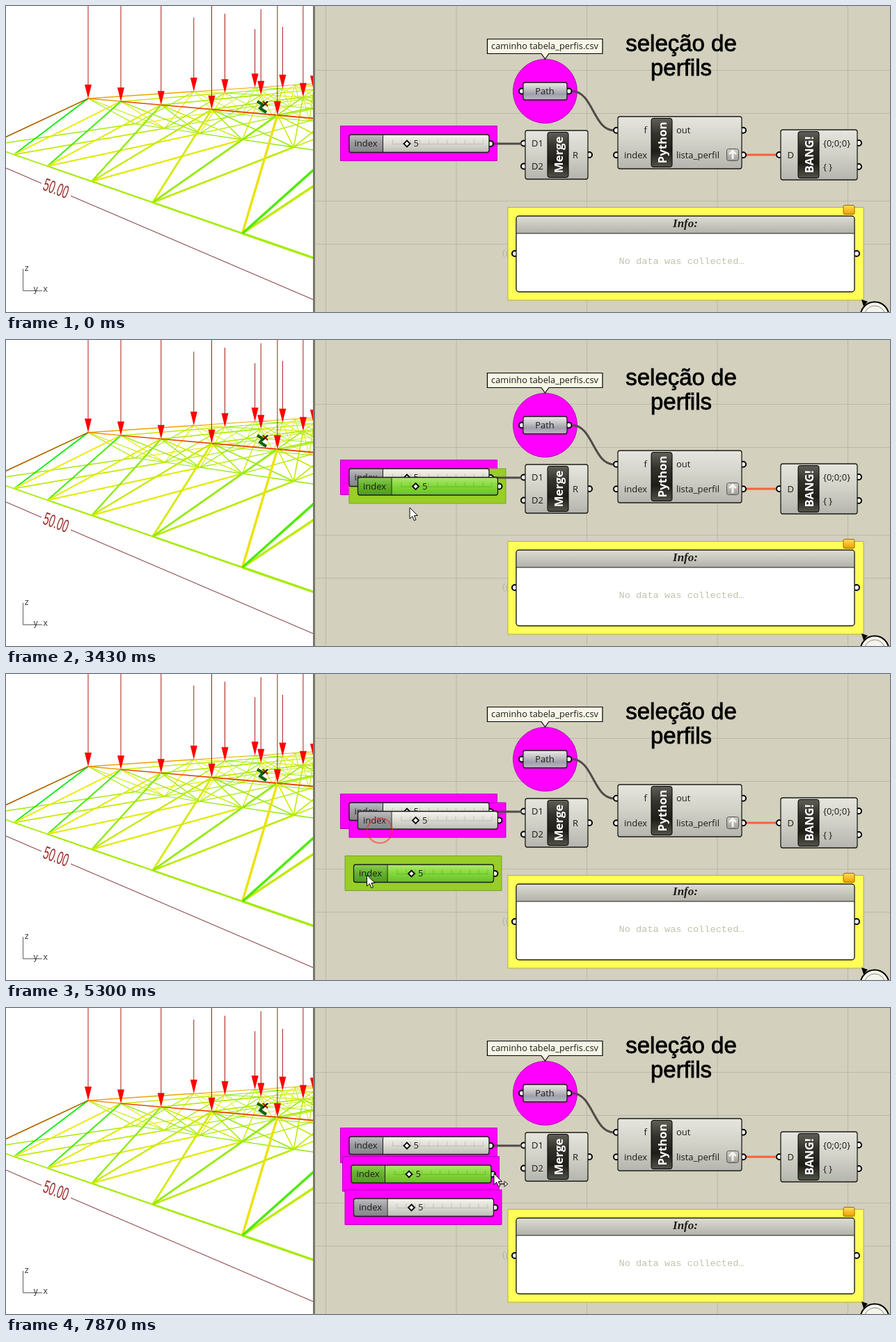
These frames come from a looping animation (1270x440 px, 8 s). An HTML page with a canvas:

```html
<!DOCTYPE html>
<html lang="pt">
<head>
<meta charset="utf-8">
<title>Seleção de perfils</title>
<style>
  html, body { margin: 0; width: 100%; height: 100%; overflow: hidden; background: #fff }
  canvas { display: block }
</style>
</head>
<body>
<canvas id="stage" width="1270" height="440"></canvas>
<script>
const stage = document.getElementById('stage');
let c = stage.getContext('2d');
const UI = '"Open Sans", "Noto Sans", sans-serif', SANS = '"Liberation Sans", Arial, sans-serif';
const MAGENTA = '#ff00ff', EDGE = '#b800b8', INK = '#1c1c18', WIRE = '#504a48';

// ---------- drawing helpers ----------
function paint(fill, stroke, width) {
  if (fill) { c.fillStyle = fill; c.fill(); }
  if (stroke) { c.strokeStyle = stroke; c.lineWidth = width; c.stroke(); }
}

function path(points, stroke, width = 1, close, fill) {
  c.beginPath();
  points.forEach(([x, y]) => c.lineTo(x, y));
  if (close) c.closePath();
  paint(fill, stroke, width);
}
const line = (a, b, color, width) => path([a, b], color, width);

function box(x, y, w, h, r, fill, stroke, width = 1) {
  c.beginPath();
  c.roundRect(x, y, w, h, r);
  paint(fill, stroke, width);
}

function circle(x, y, r, fill, stroke, width = 1) {
  c.beginPath();
  c.arc(x, y, r, 0, 7);
  paint(fill, stroke, width);
}

function shade(y, h, ...colors) {
  const g = c.createLinearGradient(0, y, 0, y + h);
  colors.forEach((color, i) => g.addColorStop(i / (colors.length - 1), color));
  return g;
}

function text(s, x, y, align = 'left', font = '13px ' + UI, color = INK) {
  c.font = font;
  c.fillStyle = color;
  c.textAlign = align;
  c.fillText(s, x, y);
}

const grip = (x, y) => circle(x, y, 4, '#fff', '#000', 2);

function wire(x1, y1, x2, y2, color) {
  const mid = (x1 + x2) / 2;
  c.beginPath();
  c.moveTo(x1, y1);
  c.bezierCurveTo(mid, y1, mid, y2, x2, y2);
  paint(null, color, 3);
}

// ---------- left: space frame in perspective ----------
// i runs along the front, j into the depth, drop is the height below the top layer
const depth = (i, j) => 1 - .0933 * i + .364 * j;
const spot = (i, j, drop = 0) => [
  (118 + 31.6 * i + 250 * j) / depth(i, j),
  (133 - 8.65 * i + 34.8 * j + drop) / depth(i, j)];
const low = (i, j) => spot(i + .5, j - .5, 53.5);

let seed = 7;
const random = () => (seed = seed * 16807 % 2147483647) / 2147483647;

function frameBars() {
  const bar = (a, b, w, hue = 58 + 26 * random()) =>
    line(a, b, `hsl(${hue} 100% 46%)`, Math.min(3.4, Math.max(.9, 1.35 / w)));

  for (let j = 4; j >= 0; j--) {
    for (let i = -1; i < 6; i++) {
      const w = depth(i + .5, j - .5), node = low(i, j);
      bar(node, low(i, j + 1), w);
      bar(node, low(i + 1, j), w, j ? 84 : 78);
      // webs from each lower node up to the corners of its bay
      for (const di of [0, 1]) for (const dj of [-1, 0]) {
        if (i + di < 0 || j + dj < 0) continue;
        const hue = j || i < 0 ? undefined : di ? 60 + 2.5 * i * i : Math.max(58, 120 - 18 * i);
        bar(node, spot(i + di, j + dj), w, hue);
      }
      if (i < 0) continue;
      bar(spot(i, j), spot(i, j + 1), depth(i, j), i ? undefined : 42);
      bar(spot(i, j), spot(i + 1, j), depth(i, j), j ? undefined : i ? 18 : 36);
    }
  }
  line(low(-1, 0), spot(0, 0), '#c04010', 1.2);
}

function loads() {
  for (let j = 2; j >= 0; j--)
    for (let i = 0; i < 5; i++) {
      const [x, y] = spot(i, j), start = y - 145 / depth(i, j);
      line([x, start], [x, y - 19], '#a81c14');
      path([[x - 5, y - 20], [x + 5, y - 20], [x, y]], null, 0, true, '#ff0000');
    }
}

function viewport() {
  c.save();
  c.beginPath();
  c.rect(0, 0, 441, 440);
  c.clip();
  frameBars();
  path([[361, 137], [369, 142], [365, 147], [374, 153]], '#146014', 4);
  line([369, 137], [376, 144], '#c01000', 2);
  line([376, 137], [369, 144], '#301000', 2);
  loads();
  line([0, 233], [51, 255], '#7c3030');
  line([93, 273], [441, 422], '#7c3030');
  c.save();
  c.transform(.75, .28, -.45, 1.32, 72, 262);
  text('50.00', 0, 6.5, 'center', '18.5px ' + SANS, '#982c28');
  c.restore();
  path([[24.5, 378], [24.5, 409.5], [52, 409.5]], '#606060');
  for (const [s, x, y] of [['z', 26, 381], ['y', 39, 411], ['x', 53, 411]])
    text(s, x, y, 'left', '12px "DejaVu Sans Mono", monospace', '#404040');
  c.restore();
}

// ---------- right: node canvas ----------
function node(x, y, w, h, label, barX, inputs, outputs) {
  const ports = (names, edge, textX, align) => names.forEach((name, k) => {
    const py = y + 2 + (h - 4) * (k + .5) / names.length;
    grip(edge, py);
    labels.push(() => text(name, textX, py + 4.5, align));
  });
  const labels = [];
  ports(inputs, x - 2, barX - 6, 'right');
  ports(outputs, x + w + 2, barX + 36, 'left');
  box(x, y, w, h, 3, shade(y, h, '#e6e5de', '#d2d1c8', '#b5b4ae'), INK, 1.3);
  box(barX, y + 2.5, 30, h - 5, 3, shade(y, h, '#66655c', '#33322c', '#1e1d18', '#5a594f'), '#000');
  labels.forEach(draw => draw());
  c.save();
  c.translate(barX + 21.5, y + h / 2);
  c.rotate(-Math.PI / 2);
  text(label, 0, 0, 'center', 'bold 16.8px ' + UI, '#fff');
  c.restore();
}

function scene() {
  c.fillStyle = '#fff';
  c.fillRect(0, 0, 1270, 440);
  viewport();
  c.fillStyle = '#d3d0bd';
  c.fillRect(441, 0, 829, 440);
  c.fillStyle = '#77776a';
  c.fillRect(441, 0, 3, 440);
  const grid = 'rgba(140,140,145,.35)';
  for (let x = 459.5; x < 1270; x += 187.5) line([x, 0], [x, 440], grid);
  for (let y = 92.5; y < 440; y += 188)
    for (const dy of [0, 62]) line([444, y + dy], [1270, y + dy], grid);

  // heading
  for (const [s, y] of [['seleção de', 65], ['perfils', 100]]) {
    text(s, 970, y, 'center', '33px ' + SANS, '#000');
    c.lineWidth = .8;
    c.strokeStyle = '#000';
    c.strokeText(s, 970, y);
  }

  // path parameter and its label
  circle(774.5, 122.5, 46, MAGENTA, EDGE);
  path([[691.5, 47.5], [857, 47.5], [857, 68.5], [780, 68.5], [774.5, 76], [769, 68.5], [691.5, 68.5]],
    '#000', 1.2, true, '#f7f6e6');
  text('caminho tabela_perfis.csv', 774, 62, 'center', '12.8px ' + UI);
  grip(741, 122.5);
  grip(808.5, 122.5);
  box(743, 110, 63, 25, 3, shade(110, 25, '#ececea', '#c8c8ca', '#a09eaa', '#bcbac6'), INK, 1.3);
  text('Path', 774, 127, 'center');
  wire(813, 122.5, 874, 179, WIRE);
  wire(1062, 214, 1108, 214, '#f8603c');

  node(746, 179, 90, 70, 'Merge', 778, ['D1', 'D2'], ['R']);
  node(879, 159, 178, 75, 'Python', 927, ['f', 'index'], ['out', 'lista_perfil']);
  node(1113, 178, 110, 72, 'BANG!', 1138, ['D'], ['{0;0;0}', '{ }']);
  box(1035.5, 205.5, 17, 17, 3, shade(205, 17, '#d0d0ca', '#a0a09c'), '#55534e');
  path([[1039, 213], [1044, 208], [1049, 213]], '#f4f4f0', 2.5);
  line([1044, 209], [1044, 220], '#f4f4f0', 3);

  // info panel
  box(721, 289.5, 511, 133.5, 0, '#ffff58', '#b4b03c');
  box(1203, 286.5, 16, 13, 2, shade(286, 13, '#ffe060', '#f0a000'), '#a06800');
  grip(731, 356);
  grip(1222, 356);
  for (const x of [722, 727]) {
    c.beginPath();
    c.arc(x, 356, 8, 2.3, 4);
    paint(null, '#aeac9c', 1);
  }
  box(733, 302, 486, 109, 4, '#fff', INK, 1.4);
  box(734, 303, 484, 24, [3, 3, 0, 0], shade(303, 24, '#dddcd2', '#b2b1aa'));
  line([733, 327], [1219, 327], INK, 1.2);
  text('Info:', 976, 318, 'center', 'italic bold 17px "Liberation Serif", "Times New Roman", serif');
  text('No data was collected…', 880.5, 371, 'left',
    '13.65px "Liberation Mono", "Courier New", monospace', '#c2c1ac');

  // compass at the corner
  circle(1248, 446, 20.5, '#f4f4ec', '#000', 2);
  circle(1248, 446, 15, null, '#8c8c80');
  path([[1229, 422], [1238, 425], [1232, 432]], null, 0, true, '#000');
}

// ---------- moving parts ----------
const APPEAR = 870, SELECT = 1200, RELEASE = 1740, PASTE = [2950, 3700], PRESS = [5000, 6670];

// Each move: start, end, then the place it comes to rest
const MOVES = [
  [APPEAR, SELECT, 617, 141], [SELECT, 1500, 571, 236], [1800, 2100, 580, 241],
  [3850, 4200, 537, 225], [PRESS[0], 5300, 518.5, 289], [5900, 6400, 533, 212.5],
  [PRESS[1], 6800, 523.5, 241], [7030, 7460, 700, 253], [7630, 7860, 701, 238]];

function mouse(t) {
  let x = 790, y = 127;
  for (const [from, to, toX, toY] of MOVES) {
    const f = Math.min(1, Math.max(0, (t - from) / (to - from))), ease = f * f * (3 - 2 * f);
    x += (toX - x) * ease;
    y += (toY - y) * ease;
  }
  return [x, y];
}

// How far the pointer has carried a slider since it was pressed
function carried(t, press) {
  const a = mouse(press), b = mouse(Math.min(Math.max(t, press), press + 350));
  return [b[0] - a[0], b[1] - a[1]];
}

function sliders(t) {
  const list = [{ x: 0, y: 0, on: t >= RELEASE && t < PASTE[0], group: true }];
  if (t >= PASTE[0]) {
    const [dx, dy] = carried(t, PRESS[1]), fresh = t < PASTE[1];
    list.push({ x: 12.5 + dx, y: 12.5 + dy, on: fresh || t >= PRESS[1], group: fresh });
  }
  if (t >= PASTE[1]) {
    const [dx, dy] = carried(t, PRESS[0]);
    list.push({ x: 25 + dx, y: 25 + dy, on: t < PRESS[1], group: true });
  }
  return list;
}

function groupBox({ x, y, on, group }) {
  const green = on && group;
  box(480.5 + x, 172.5 + y, 225, 50, 0, green ? '#98ce26' : MAGENTA, green ? '#78a030' : EDGE);
}

function slider({ x, y, on }) {
  c.save();
  c.translate(x, y);
  grip(696, 198);
  const body = on ? ['#b0ea70', '#82d83a', '#6cc030'] : ['#f6f6f0', '#dcdcd4', '#bebeb6'];
  const name = on ? ['#8ccc50', '#62b02c', '#529c24'] : ['#c0c0c2', '#9a999e', '#868588'];
  box(493, 185, 201, 25.5, 3, shade(185, 25, ...body));
  box(493, 185, 48, 25.5, [3, 0, 0, 3], shade(185, 25, ...name));
  const tick = on ? 'rgba(50,110,0,.25)' : 'rgba(110,110,100,.25)';
  for (let i = 0; i < 11; i++) line([555.5 + 13 * i, 192], [555.5 + 13 * i, 198], tick);
  line([555, 198.5], [686, 198.5], tick);
  line([541.5, 185], [541.5, 210.5], INK);
  box(493, 185, 201, 25.5, 3, null, INK, 1.3);
  path([[576, 193.5], [580.5, 198], [576, 202.5], [571.5, 198]], '#000', 1.8, true, '#fff');
  text('index', 500.5, 202);
  text('5', 585.5, 202);
  c.restore();
}

function ring(t, press) {
  const age = t - press;
  if (age >= 0 && age < 350) circle(...mouse(press), age * .06, null, 'rgba(245,50,40,.6)', 2);
}

function dashed(x1, y1, x2, y2, fill) {
  c.setLineDash([2, 1.5]);
  box(Math.min(x1, x2) + .5, Math.min(y1, y2) + .5, Math.abs(x2 - x1), Math.abs(y2 - y1), 0, fill, '#333');
  c.setLineDash([]);
}

function pointer(t) {
  if (t < APPEAR) return;
  const [x, y] = mouse(t);
  if (t >= SELECT + 40 && t < RELEASE) {
    dashed(617, 141, ...mouse(t - 40), 'rgba(160,170,230,.45)');
    dashed(x - 11, y - 4, x - 1, y + 5);
  }
  if (t >= 7400) {
    line([x + 9, y + 15], [x + 17, y + 15], '#222', 1.5);
    path([[x + 15, y + 11], [x + 20, y + 15], [x + 15, y + 19]], '#222', 1, true, '#e8e8d8');
  }
  const arrow = [[0, 0], [0, 16], [3.8, 12.6], [6.4, 18.6], [9, 17.4], [6.4, 11.6], [11.4, 11.4]];
  path(arrow.map(([px, py]) => [x + px, y + py]), '#000', 1, true, '#fff');
}

// The unchanging picture is painted once
const still = document.createElement('canvas');
still.width = 1270;
still.height = 440;
const live = c;
c = still.getContext('2d');
scene();
c = live;

function frame(now) {
  const t = now % 8000, list = sliders(t);
  c.drawImage(still, 0, 0);
  list.forEach(groupBox);
  wire(700, 198, 741, 198, list[0].on ? '#9ab85c' : WIRE);
  list.forEach(slider);
  PRESS.forEach(press => ring(t, press));
  pointer(t);
  requestAnimationFrame(frame);
}
requestAnimationFrame(frame);
</script>
</body>
</html>
```
